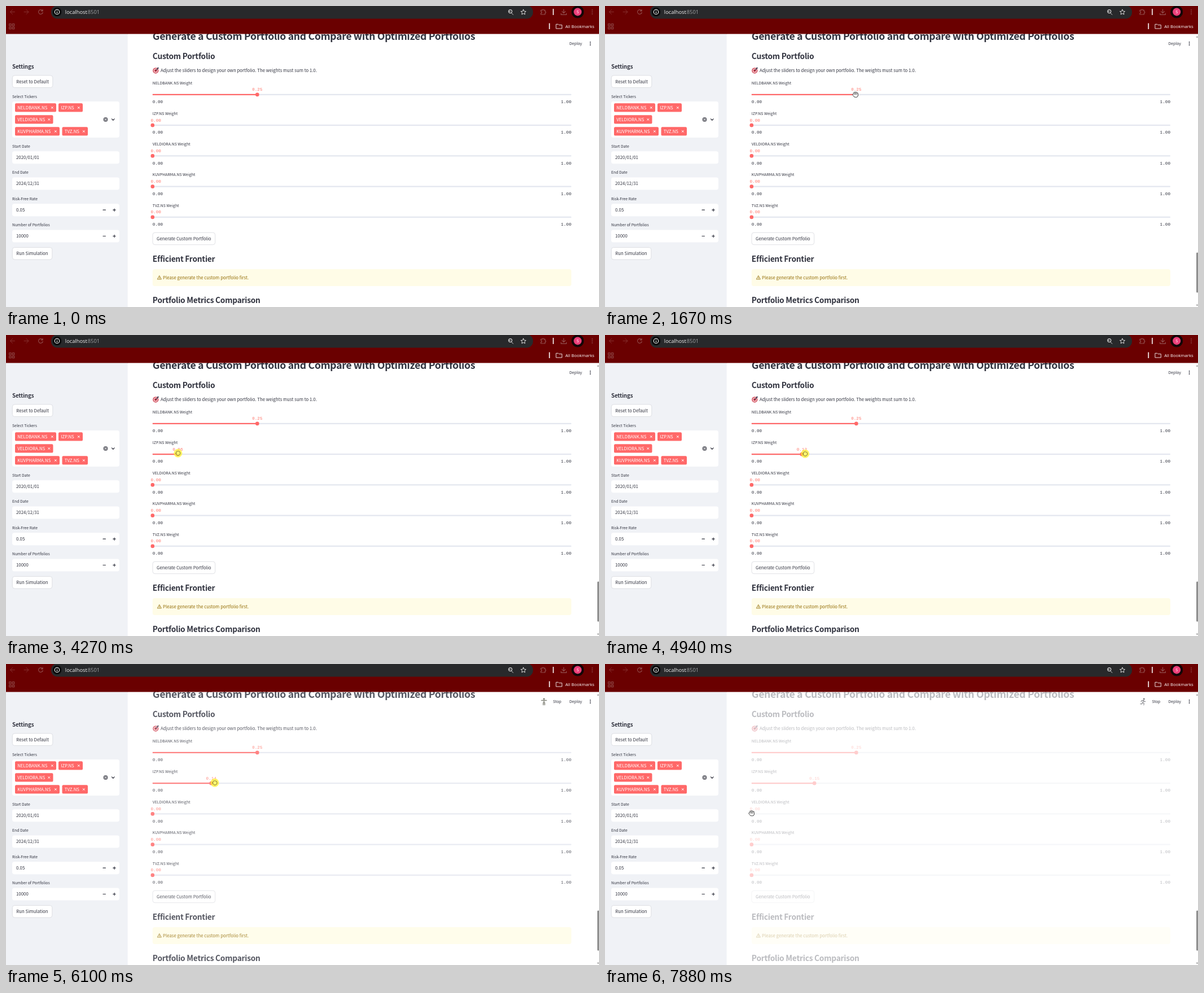
An HTML page with a canvas for the animation above (8 s loop, 1051 by 533 pixels).

```html
<!DOCTYPE html>
<html lang="en">
<head>
<meta charset="utf-8">
<title>Portfolio sliders</title>
<style>
  html, body { margin: 0; width: 100%; height: 100%; overflow: hidden; background: #fff; }
  canvas { display: block; }
</style>
</head>
<body>
<canvas id="stage" width="1051" height="533"></canvas>
<script>
const ctx = document.getElementById('stage').getContext('2d');
const LOOP = 8000;
const REM = 8.76, SMALL = 7.66;
const INK = '#31333f', RED = '#ff6868', DIM = '#92504f';
const LEFT = 259.8, RIGHT = 1002;

// scale: glyph size relative to the nominal size; cap: half the cap height
const FONTS = {
  ui: { family: '"Noto Sans CJK SC", "Noto Sans CJK JP", "Noto Sans CJK", "Open Sans", sans-serif', scale: 1 / 1.117, cap: 0.33 },
  mono: { family: '"Liberation Mono", monospace', scale: 1, cap: 0.33 },
  chrome: { family: '"Open Sans", sans-serif', scale: 1, cap: 0.357 }
};

// Text is set at 100px and scaled down so that small sizes keep exact spacing.
function text(str, x, cy, size, color = INK, { font = 'ui', weight = 400, align = 'left', spacing = 0 } = {}) {
  const f = FONTS[font], k = size * f.scale / 100;
  ctx.save();
  ctx.translate(x, cy + f.cap * size);
  ctx.scale(k, k);
  ctx.font = `${weight} 100px ${f.family}`;
  ctx.letterSpacing = spacing + 'px';
  ctx.textAlign = align;
  ctx.fillStyle = color;
  ctx.fillText(str, 0, 0);
  ctx.restore();
}

const heading = (str, x, cy, size) => text(str, x, cy, size, INK, { weight: 700, spacing: -1.7 });

function rect(x, y, w, h, fill) {
  ctx.fillStyle = fill;
  ctx.fillRect(x, y, w, h);
}

function box(x, y, w, h, r, fill, stroke) {
  ctx.beginPath();
  ctx.roundRect(x, y, w, h, r);
  paint(fill, stroke, 0.7);
}

function disc(x, y, r, fill, stroke, width = 1) {
  ctx.beginPath();
  ctx.arc(x, y, r, 0, Math.PI * 2);
  paint(fill, stroke, width);
}

function paint(fill, stroke, width) {
  if (fill) { ctx.fillStyle = fill; ctx.fill(); }
  if (stroke) { ctx.strokeStyle = stroke; ctx.lineWidth = width; ctx.stroke(); }
}

function draw(path, x, y, fill, stroke, width = 1) {
  ctx.save();
  ctx.translate(x, y);
  ctx.lineCap = ctx.lineJoin = 'round';
  const p = new Path2D(path);
  if (fill) { ctx.fillStyle = fill; ctx.fill(p); }
  if (stroke) { ctx.strokeStyle = stroke; ctx.lineWidth = width; ctx.stroke(p); }
  ctx.restore();
}

function dots(x, y, gap, color) {
  for (const i of [-1, 0, 1]) disc(x, y + i * gap, 0.9, color);
}

function button(str, x, y, w) {
  box(x, y, w, 21.5, 4, '#fff', '#d3d5da');
  text(str, x + 7, y + 10.7, REM);
}

function browserBar() {
  rect(0, 0, 1051, 49.5, '#6a0000');
  box(80, -1, 854, 23.5, 11, '#28292b');
  draw('M4 0H-4M0 -4L-4 0L0 4', 11.5, 10.5, null, '#85302f');
  draw('M-4 0H4M0 -4L4 0L0 4', 36, 10.5, null, '#85302f');
  draw('M3.2 -2.2A3.9 3.9 0 1 0 3.8 1M3.6 -4.2V-1.6H1', 61.5, 10.5, null, DIM, 1.1);
  disc(90.5, 10.5, 8, '#0c0d0e');
  disc(90.5, 10.5, 4.2, null, '#fff', 1.1);
  draw('M0 0V2M0 -2V-1.9', 90.5, 10.5, null, '#fff', 1.1);
  text('localhost', 104.8, 11, 9.3, '#f2f2f2', { font: 'chrome' });
  text(':8501', 142.3, 11, 9.3, '#a4a6a8', { font: 'chrome' });

  disc(893.8, 9.6, 3, null, '#d8d8d8', 1.1);
  draw('M2.2 2.2L5 5M-2.4 -0.9H0.2', 893.8, 10.4, null, '#d8d8d8', 1);
  draw('M0 -4.6L1.4 -1.6L4.6 -1.3L2.2 0.9L2.9 4.2L0 2.5L-2.9 4.2L-2.2 0.9L-4.6 -1.3L-1.4 -1.6Z', 917, 10.8, null, '#d8d8d8');
  draw('M-4 -3H-1.5A1.4 1.4 0 0 1 1.3 -3H3.4V-0.6A1.4 1.4 0 0 1 3.4 2.2V4.6H-4V2.4A1.6 1.6 0 0 0 -4 -0.8Z', 952, 10.4, null, DIM, 1.2);
  rect(969, 5, 1.8, 11, '#e8dada');
  draw('M0 -4.5V2M-3 -0.8L0 2.2L3 -0.8M-4.8 2.5V4.8H4.8V2.5', 988.5, 10.5, null, DIM, 1.2);
  disc(1013.2, 10.4, 11, '#120607');
  disc(1013.2, 10.4, 7, '#ec407a');
  text('S', 1013.2, 10.4, 7.5, '#fff', { font: 'chrome', align: 'center' });
  dots(1039, 10.5, 3.4, DIM);

  for (const x of [5.7, 11.3]) for (const y of [31.7, 37.3]) {
    ctx.strokeStyle = DIM;
    ctx.lineWidth = 1;
    ctx.strokeRect(x, y, 3.4, 3.4);
  }
  rect(962.3, 30.5, 1.8, 10.5, '#f0e4e4');
  draw('M-5 -3.7H-1.5L-0.2 -2.4H5V4H-5Z', 980.3, 36, null, '#e9dede');
  text('All Bookmarks', 991.2, 36, 7.7, '#fff', { font: 'chrome' });
}

function tag(name, x, cy, w) {
  box(x, cy - 7.7, w, 15.3, 2.2, RED);
  text(name + '.NS', x + 4.2, cy, REM, '#fff');
  draw('M-1.5 -1.5L1.5 1.5M1.5 -1.5L-1.5 1.5', x + w - 7.2, cy, null, '#fff');
}

function field(label, value, y, stepper) {
  text(label, 11, y, SMALL);
  box(11, y + 9.2, 190, 22, 4, '#fff');
  text(value, 18, y + 20.2, REM);
  if (!stepper) return;
  draw('M-2.2 0H2.2', 174.2, y + 20.2, null, INK, 1.2);
  draw('M-2.2 0H2.2M0 -2.2V2.2', 192, y + 20.2, null, INK, 1.2);
}

const TICKERS = ['NELDBANK', 'IZP', 'VELDIORA', 'KUVPHARMA', 'TVZ'];

function sidebar() {
  rect(0, 49, 215.5, 484, '#f0f2f6');
  heading('Settings', 11, 107, 10.95);
  button('Reset to Default', 11.3, 123, 71.5);
  text('Select Tickers', 11, 160, SMALL);
  box(11, 169, 190, 64, 4, '#fff');
  const spots = [[16, 180, 73], [93, 180, 43], [16, 201, 67.5], [16, 222, 79], [99.5, 222, 45.5]];
  spots.forEach((s, i) => tag(TICKERS[i], ...s));
  disc(176.5, 201, 4, '#74757c');
  draw('M-1.4 -1.4L1.4 1.4M1.4 -1.4L-1.4 1.4', 176.5, 201, null, '#fff', 0.9);
  draw('M-2.3 -1.1L0 1.2L2.3 -1.1', 189.8, 201, null, INK, 1.3);
  field('Start Date', '2020/01/01', 248);
  field('End Date', '2024/12/31', 294.4);
  field('Risk-Free Rate', '0.05', 341, true);
  field('Number of Portfolios', '10000', 387.3, true);
  button('Run Simulation', 11.3, 427.5, 70.5);
}

function slider(name, i, value) {
  const y = 156.9 + i * 54.25, span = RIGHT - LEFT, x = LEFT + value * span;
  text(name + '.NS Weight', LEFT, y - 20.8, SMALL);
  box(LEFT, y - 1.1, span, 2.2, 1, '#e4e7ef');
  if (value) rect(LEFT, y - 1.1, x - LEFT, 2.2, RED);
  disc(x, y, 3.3, RED);
  const mono = { font: 'mono' };
  text(value.toFixed(2), Math.max(x, 265.7), y - 9, SMALL, '#ff766c', { font: 'mono', align: 'center' });
  text('0.00', LEFT, y + 12.6, SMALL, INK, mono);
  text('1.00', RIGHT, y + 12.6, SMALL, INK, { font: 'mono', align: 'right' });
}

function content(weights, opacity) {
  rect(215.5, 49, 836, 484, '#fff');
  heading('Generate a Custom Portfolio and Compare with Optimized Portfolios', LEFT, 53.2, 19.7);
  heading('Custom Portfolio', LEFT, 89.2, 15.33);
  [[5, '#cf3344'], [3.6, '#f3e9ea'], [2.4, '#cf3344']].forEach(([r, c]) => disc(265.3, 114.4, r, c));
  draw('M0 0L4.6 -4.4M2.8 -4.6L4.9 -4.6', 265.5, 114.2, null, '#3b3f55', 1.2);
  text('Adjust the sliders to design your own portfolio. The weights must sum to 1.0.', 273.9, 114.4, REM);
  TICKERS.forEach((name, i) => slider(name, i, weights[i]));
  button('Generate Custom Portfolio', 260, 401.2, 110.7);
  heading('Efficient Frontier', LEFT, 447.8, 15.33);
  box(LEFT, 466, RIGHT - LEFT, 30, 4, '#fffce7');
  draw('M0 -3.2L3.4 2.9H-3.4ZM0 -1V0.9M0 1.9V2', 272, 481, null, '#926c05', 0.8);
  text('Please generate the custom portfolio first.', 278, 481.2, REM, '#926c05');
  heading('Portfolio Metrics Comparison', LEFT, 521.4, 15.33);
  if (opacity < 1) rect(215.5, 49, 836, 484, `rgba(255,255,255,${1 - opacity})`);
}

const POSES = {
  stand: 'M-4.5 -2.6H4.5M0 -2.6V1.5M-1.2 1.5V5.6M1.2 1.5V5.6',
  run: 'M1 -2.8L-0.6 1.2L1.8 2.8L1.4 5.8M-0.6 1.2L-1.8 3.6H-4.6M1 -2.8L-2.2 -2.4L-3.4 -0.2M1 -2.8L2.4 -0.4L4.4 -0.8',
  stride: 'M0.8 -2.8L-0.2 1.2L-0.8 3.2L-2.8 5.6M-0.2 1.2L2.6 2L2.4 4.6M0.8 -2.8L-1.6 -1L-0.8 0.8M0.8 -2.8L3 -1.4L3.8 -2.8'
};

function header(t) {
  text('Deploy', 998.5, 66.6, SMALL);
  dots(1035.6, 66.6, 2.6, INK);
  if (t < 5560) return;
  text('Stop', 969.5, 66.6, SMALL);
  const busy = t > 6800 && t < 7650 && Math.floor(t / 140) % 2;
  const pose = t < 6310 ? 'stand' : busy ? 'stride' : 'run';
  const tint = t < 6310 ? '#85867c' : '#85868b';
  disc(pose === 'stand' ? 953.5 : 955.2, 61.9, 1.6, tint);
  draw(POSES[pose], 953.5, 67, null, tint, pose === 'stand' ? 1.5 : 1.1);
}

function scrollbar() {
  box(1048, 436.5, 3.2, 71, 1.5, '#8f8f8f');
  draw('M-1.8 1.2L0 -1.2L1.8 1.2Z', 1049.4, 54.5, '#8f8f8f');
  draw('M-1.8 -1.2L0 1.2L1.8 -1.2Z', 1049.4, 530, '#8f8f8f');
}

// Each move: start, end, number of steps, end point.
const MOVES = [
  [240, 390, 3, 715, 339],
  [650, 860, 4, 480, 195],
  [1130, 1260, 3, 452, 160],
  [1460, 1670, 4, 443.5, 156.5],
  [2340, 2480, 3, 268, 271],
  [2740, 2880, 3, 263, 213.5],
  [3020, 3210, 3, 259.5, 208],
  [3870, 4550, 10, 335, 210],
  [4740, 4940, 4, 354.7, 210.3],
  [5080, 5290, 4, 363, 210.3],
  [5560, 6100, 8, 370, 210.3],
  [6170, 6310, 3, 372.7, 210.5],
  [7210, 7450, 4, 247, 285],
  [7530, 7680, 3, 259.5, 264]
];

function pointer(t) {
  let x = 324, y = 590;
  for (const [start, end, steps, toX, toY] of MOVES) {
    if (t < start) break;
    const done = Math.floor((t - start) / (end - start) * (steps - 1) + 1e-6) + 1;
    const p = Math.min(1, done / steps);
    x += (toX - x) * p;
    y += (toY - y) * p;
  }
  return { x, y };
}

const SHAPES = [[240, 'arrow'], [1530, 'hand'], [2340, 'arrow'], [2880, 'hand'], [3870, 'grab'], [7210, 'arrow'], [7605, 'hand']];

function cursor(t, { x, y }) {
  const shape = SHAPES.filter(s => t >= s[0]).pop()?.[1];
  if (shape === 'arrow') {
    draw('M0 0V9.4L2.2 7.4L3.7 10.8L5.2 10.1L3.7 6.9L6.8 6.7Z', x, y, '#fff', '#111', 0.7);
  } else if (shape === 'hand') {
    const fingers = 'M-2.1 1V-2.8M0 0V-3.6M2.1 0V-3.1M4 1V-1.7M-1.8 2.8L-3.9 0.4';
    const palm = 'M-2.4 0.4H4.4V2.4L2.8 4.4H-0.8L-2.8 2.2Z';
    draw(fingers, x, y, null, '#222', 2.5);
    draw(palm, x, y, null, '#222', 1.6);
    draw(palm, x, y, '#fff');
    draw(fingers, x, y, null, '#fff', 1.3);
  } else if (shape === 'grab') {
    const pressed = t < 6380;
    if (pressed) disc(x, y, 7.5, 'rgba(255,240,50,.75)');
    draw('M-3.6 0.2L-2.6 -2.8Q-1.6 -3.8 -0.6 -3.2Q0.6 -4 1.6 -3Q3.6 -3.2 3.8 -1V1.2Q3 3.6 1.4 3.8H-1.2Q-3 3 -3.6 0.2Z',
      x, y, pressed ? 'rgba(255,246,120,.8)' : 'rgba(255,255,255,.85)', pressed ? '#6a6428' : '#3a3a30', 0.9);
  }
}

const FADE = [[5080, 1], [5290, 0.82], [6380, 0.82], [6700, 0.36], [7140, 0.33]];

function opacityAt(t) {
  if (t <= FADE[0][0]) return 1;
  for (let i = 1; i < FADE.length; i++) {
    const [t0, a] = FADE[i - 1], [t1, b] = FADE[i];
    if (t < t1) return a + (b - a) * (t - t0) / (t1 - t0);
  }
  return FADE[FADE.length - 1][1];
}

function dragged(t) {
  if (t < 3870) return 0;
  const { x } = pointer(Math.min(t, 7200));
  return Math.max(0, Math.floor((x - 260) / 742 * 100) / 100);
}

function render(t) {
  content([0.25, dragged(t), 0, 0, 0], opacityAt(t));
  header(t);
  sidebar();
  browserBar();
  if (t >= 240) scrollbar();
  cursor(t, pointer(t));
}

function tick() {
  render(performance.now() % LOOP);
  requestAnimationFrame(tick);
}
tick();
</script>
</body>
</html>
```
